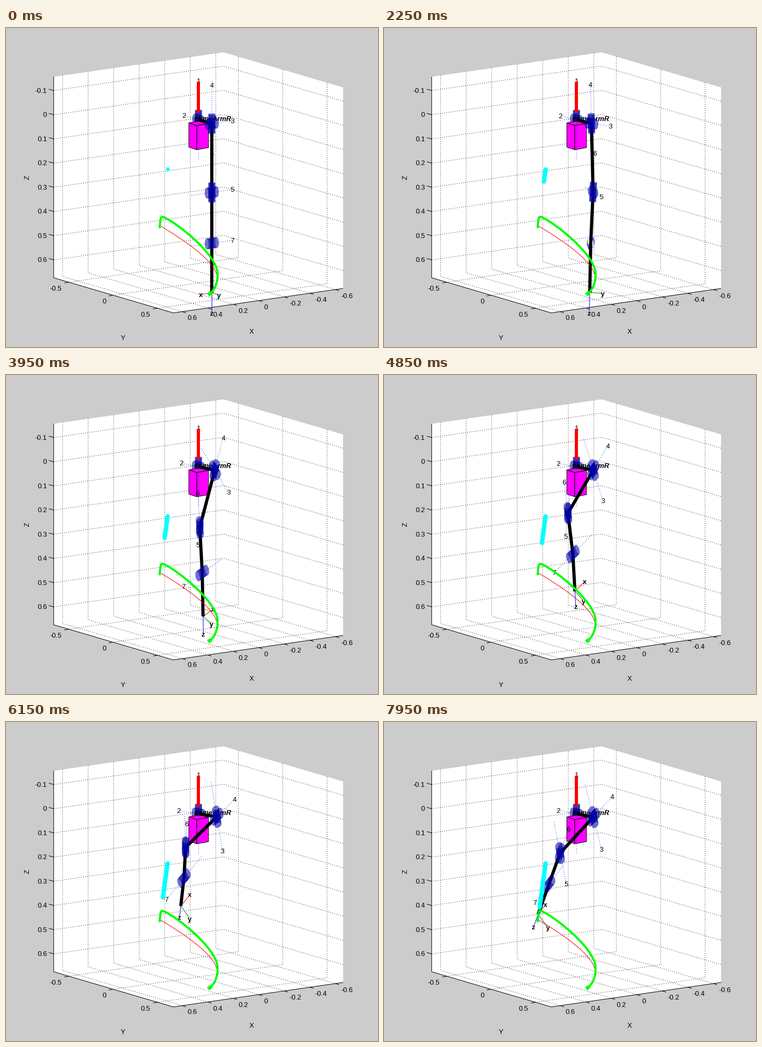
Animation of 700x600 px, one loop 8000 ms. Source, as a matplotlib script:

```python
import numpy as np
import matplotlib.pyplot as plt
from matplotlib.animation import FuncAnimation
from matplotlib.collections import PolyCollection
from matplotlib.patches import PathPatch, Polygon
from matplotlib.path import Path

plt.rcParams["font.family"] = "Liberation Sans"
W, H, DPI = 700, 600, 100
PX = 72 / DPI
FRAME_MS, FRAMES = 50, 160
STEPS = FRAMES // 2
DOTS = (0, (1, 3))

fig = plt.figure(figsize=(W / DPI, H / DPI), dpi=DPI, facecolor="0.8")
ax = fig.add_axes([0, 0, 1, 1])
ax.set(xlim=(0, W), ylim=(H - 0.5, -0.5))
ax.axis("off")

# Axonometric view: data coordinates to screen pixels
VIEW = np.array([[-240.2, 167, 0], [34.6, 49, 455]])
ORIGIN = np.array([362.2, 172.2])
STRETCH = np.array([292, 459])


def project(*point):
    return ORIGIN + VIEW @ np.array(point)


def line(points, color="black", width=1, style="-", z=1):
    x, y = zip(*points)
    return ax.plot(x, y, color=color, lw=width * PX, ls=style, zorder=z,
                   solid_capstyle="butt", solid_joinstyle="round")[0]


def label(x, y, text, ha="center", z=4, **kw):
    return ax.text(x, y, text, ha=ha, va="center_baseline", fontsize=13 * PX,
                   zorder=z, **kw)


def draw_box():
    (x0, x1), (y0, y1), (z0, z1) = (-0.66, 0.67), (-0.668, 0.68), (-0.157, 0.674)
    outline = [(x1, y0, z0), (x0, y0, z0), (x0, y1, z0),
               (x0, y1, z1), (x1, y1, z1), (x1, y0, z1)]
    corners = [project(*p) for p in outline]
    ax.add_patch(Polygon(corners, fc="white", ec="none", zorder=0))
    line([corners[0], corners[5], corners[4], corners[3]])

    def grid(*points):
        line([project(*p) for p in points], style=DOTS)

    def tick(corner, step, gap, value, ha):
        p = project(*corner)
        line([p, p + step])
        label(*(p + gap), f"{value:g}", ha)

    for x in np.arange(-3, 4) / 5:
        grid((x, y0, z0), (x, y0, z1), (x, y1, z1))
        tick((x, y1, z1), (7, 2.2), (10, 11.5), x, "left")
    for y in (-0.5, 0, 0.5):
        grid((x0, y, z0), (x0, y, z1), (x1, y, z1))
        tick((x1, y, z1), (-8, 1.5), (-13, 11), y, "right")
    for z in np.arange(-1, 7) / 10:
        grid((x1, y0, z), (x0, y0, z), (x0, y1, z))
        tick((x1, y0, z), (-9, -2.6), (-12.5, -0.5), z, "right")
    label(462, 570, "X")
    label(220, 582, "Y")
    ax.text(41, 281, "Z", rotation=90, ha="center", va="center", fontsize=13 * PX)


def draw_body():
    left, front, right, back = (344, 178), (359, 183), (381, 179), (366, 174)
    down = [(x, y + 45.5) for x, y in (right, front, left)]
    for face in ([left, back, right, front],
                 [left, front, down[1], down[2]],
                 [front, right, down[0], down[1]]):
        ax.add_patch(Polygon(face, fc="magenta", ec="black", lw=PX, zorder=2))


def draw_curve(points, color, width, z):
    codes = [Path.MOVETO] + [Path.CURVE4] * (len(points) - 1)
    ax.add_patch(PathPatch(Path(points, codes), fc="none", ec=color,
                           lw=width * PX, capstyle="butt", zorder=z))


draw_box()
draw_body()
draw_curve([(289, 371), (330, 395), (396, 438), (397, 468),
            (397, 482), (391, 492), (383, 500)], "red", 1, 8)
draw_curve([(383, 500), (392, 492), (399, 480), (398, 460),
            (396, 425), (322, 366), (297, 355.5),
            (291, 353.5), (291, 354), (289, 376)], "lime", 4, 9)
line([(380.5, 501.5), (386, 497)], "lime", 7, z=9)
line([(362, 100), (362, 158)], "red", 6, z=6)
label(424, 170, "frameArmR", "right", z=6.5, weight="bold", style="italic")

# Joint angles in radians at equal time steps, starting from the rest pose
ANGLES = np.array([
    [0, 0.05, 0.135, 0.195, 0.30, 0.20],
    [0, 0.02, 0.40, 0.97, 1.20, 1.08],
    [0, 0.17, 0.27, 0.02, -0.20, -0.22],
    [0, 0.33, 0.73, 0.61, 0.25, 0.13],
    [0, -0.16, 0.06, 0.75, 0.72, 0.53],
    [0, 0.20, 0.72, 0.76, 0.82, 0.92],
    [0, 0.05, 0, -0.13, -0.06, 0],
])
SLOPES = np.gradient(ANGLES, axis=1)
SLOPES[:, [0, -1]] /= 2
# Each joint turns the first frame axis toward the second, about the third
TURNS = ["xyz", "zxy", "zyx", "xyz", "zyx", "xyz", "zyx"]
# Link that follows a joint: frame axis and length
LINKS = {2: ("y", 0.15), 4: ("z", 0.284), 6: ("z", 0.21), 7: ("z", 0.205)}
AXIS_LEN, TRIAD_LEN, TUBE_R, TUBE_H = 0.16, 0.085, 0.022, 0.04
HALF_TURN = np.linspace(0, np.pi, 13)[:, None]


def angles_at(progress):
    """Cubic Hermite blend between the key angles."""
    last = ANGLES.shape[1] - 1
    i = min(int(progress * last), last - 1)
    t = progress * last - i
    a, b, ma, mb = ANGLES[:, i], ANGLES[:, i + 1], SLOPES[:, i], SLOPES[:, i + 1]
    return (a + (b - a) * t * t * (3 - 2 * t)
            + ma * t * (1 - t) ** 2 - mb * t * t * (1 - t))


def solve_arm(angles):
    """Link points, (joint point, axis) pairs and the hand's frame."""
    frame = dict(zip("xyz", np.eye(3)))
    points, joints = [np.zeros(3)], []
    for n, (q, (a, b, pivot)) in enumerate(zip(angles, TURNS), start=1):
        u, v = frame[a], frame[b]
        frame[a] = u * np.cos(q) + v * np.sin(q)
        frame[b] = v * np.cos(q) - u * np.sin(q)
        joints.append((points[-1], -frame[pivot]))
        if n in LINKS:
            axis, length = LINKS[n]
            points.append(points[-1] + length * frame[axis])
    return points, joints, frame


def tube(center, axis):
    """Front and back halves of an open tube, as seen on screen."""
    u = VIEW @ axis / STRETCH
    length = min(np.hypot(*u), 1)
    along = u / max(length, 1e-9)
    across = np.array([-along[1], along[0]])
    shift = TUBE_H * u
    halves = []
    for side in (1, -1):
        bulge = side * np.sqrt(1 - length ** 2) * np.sin(HALF_TURN) * along
        rim = TUBE_R * (np.cos(HALF_TURN) * across + bulge)
        halves.append(center + np.vstack([rim + shift, (rim - shift)[::-1]]) * STRETCH)
    return halves


def tube_layer(z):
    layer = PolyCollection([], facecolors=[(0, 0, 0.64, 0.55)],
                           edgecolors="none", zorder=z)
    return ax.add_collection(layer)


arm = line([(0, 0)], width=6, z=6)
base_tubes, arm_tubes = tube_layer(1.5), tube_layer(7)
axis_lines = [line([(0, 0)], "blue", style=DOTS, z=3) for _ in TURNS]
axis_names = [label(0, 0, str(n + 1)) for n in range(len(TURNS))]
hand_lines = {n: line([(0, 0)], c, z=5)
              for n, c in zip("xyz", ("red", "green", "blue"))}
hand_names = {n: label(0, 0, n, weight="bold") for n in "xyz"}
trail, = ax.plot([], [], ls="none", marker=(8, 2, 0), color="cyan",
                 ms=7.5 * PX, mew=1.3 * PX, zorder=10)


def draw(frame_number):
    step = (frame_number + 1) // 2
    points, joints, frame = solve_arm(angles_at(step / STEPS))
    arm.set_data(*np.array([project(*p) for p in points]).T)

    tubes = []
    for (point, axis), dots, name in zip(joints, axis_lines, axis_names):
        center, reach = project(*point), VIEW @ axis * AXIS_LEN
        dots.set_data(*np.array([center - reach, center + reach]).T)
        name.set_position(np.round(center + reach))
        tubes.append(tube(center, axis))
    base_tubes.set_verts(sum(tubes[:2], []))
    arm_tubes.set_verts(sum(tubes[2:], []))

    hand = project(*points[-1])
    for n, axis in frame.items():
        reach = VIEW @ axis * TRIAD_LEN
        hand_lines[n].set_data(*np.array([hand, hand + 0.9 * reach]).T)
        hand_names[n].set_position(np.round(hand + reach))

    marks = np.arange(step + 1)
    trail.set_data(303.5 - 0.14 * marks, 264 + 1.05 * marks)
    return []


anim = FuncAnimation(fig, draw, frames=FRAMES, interval=FRAME_MS,
                     repeat=True, repeat_delay=0)
plt.show()
```
